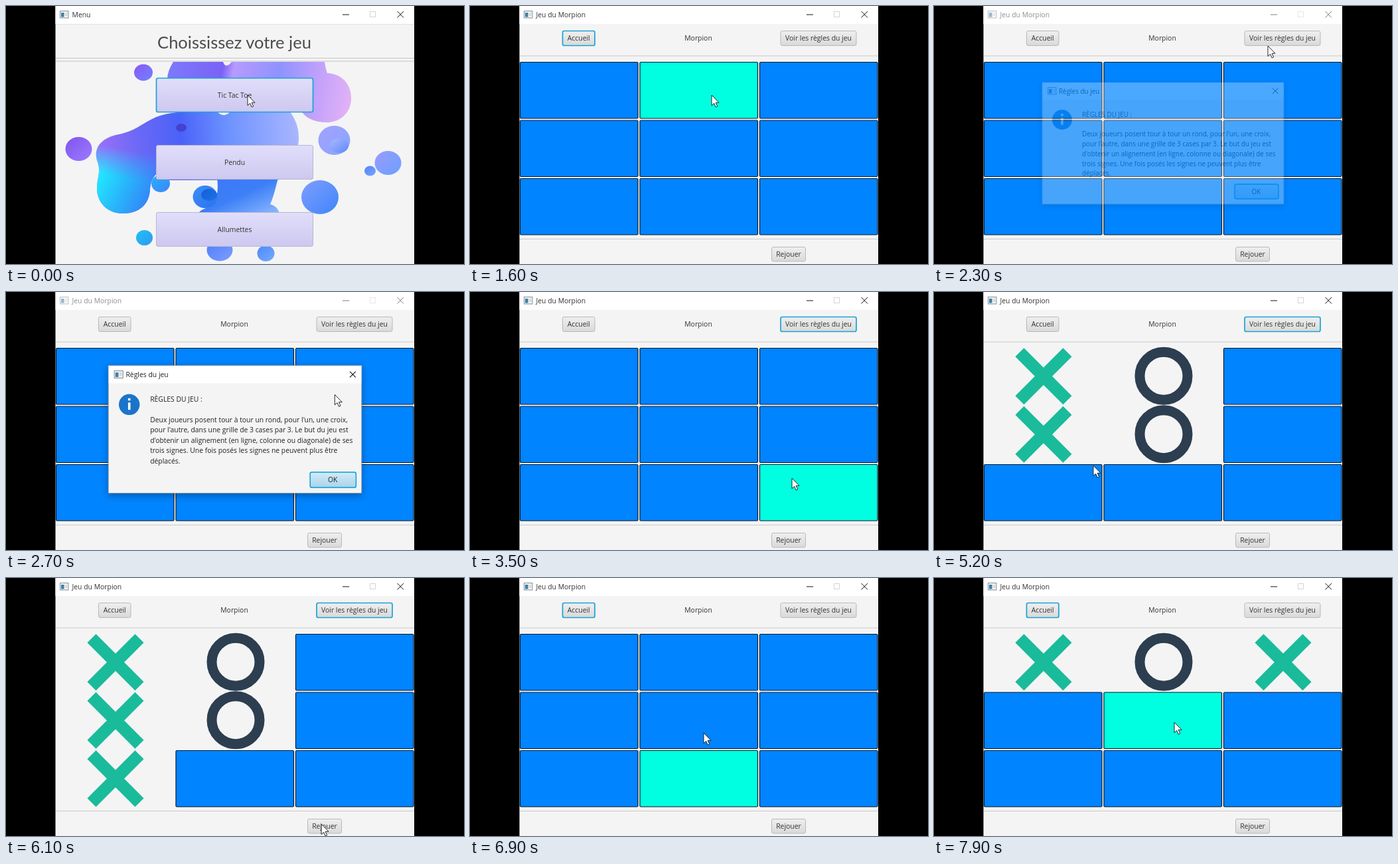
These frames come from a looping animation (690x388 px, 8 s). An HTML page:

```html
<!DOCTYPE html>
<html lang="fr">
<head>
<meta charset="utf-8">
<title>Jeu du Morpion</title>
<style>
  html, body { margin: 0; width: 100%; height: 100%; overflow: hidden; background: #000; }
  svg { display: block; width: 690px; height: 388px; }
  text { font: 10.4px "Open Sans", "Noto Sans", sans-serif; fill: #333; }
  .head { font: 25.5px Lato, "Open Sans", sans-serif; fill: #4c4c4c; }
  .mid { text-anchor: middle; }
  #dialog text { font-size: 9.92px; fill: #222; }
</style>
</head>
<body>
<svg viewBox="0 0 690 388" xmlns="http://www.w3.org/2000/svg">
  <defs>
    <linearGradient id="lilac" x2="0" y2="1"><stop stop-color="#e1defb"/><stop offset="1" stop-color="#cdc8ef"/></linearGradient>
    <linearGradient id="grey" x2="0" y2="1"><stop stop-color="#efefef"/><stop offset="1" stop-color="#d9d9d9"/></linearGradient>
    <linearGradient id="okFill" x2="0" y2="1"><stop stop-color="#d3ebf8"/><stop offset="1" stop-color="#a9d3ea"/></linearGradient>
    <linearGradient id="body" gradientUnits="userSpaceOnUse" x1="135" y1="215" x2="442" y2="190">
      <stop stop-color="#9d70f8"/><stop offset=".22" stop-color="#6a68f6"/><stop offset=".42" stop-color="#4a62f8"/>
      <stop offset=".65" stop-color="#6c92ff"/><stop offset="1" stop-color="#aab6ff"/>
    </linearGradient>
    <linearGradient id="lobe" gradientUnits="userSpaceOnUse" x1="140" y1="250" x2="222" y2="290">
      <stop stop-color="#22eaff"/><stop offset=".45" stop-color="#27b9fb"/><stop offset="1" stop-color="#3580f6"/>
    </linearGradient>
    <linearGradient id="fade" gradientUnits="userSpaceOnUse" x1="180" y1="215" x2="172" y2="258">
      <stop stop-color="#fff" stop-opacity="0"/><stop offset="1" stop-color="#fff"/>
    </linearGradient>
    <mask id="lobeMask"><rect x="120" y="190" width="110" height="130" fill="url(#fade)"/></mask>
    <linearGradient id="leg" x2="1" y2="1"><stop stop-color="#3f74f8"/><stop offset=".5" stop-color="#3c7ff6"/><stop offset="1" stop-color="#93bcff"/></linearGradient>
    <linearGradient id="top" gradientUnits="userSpaceOnUse" x1="240" y1="95" x2="520" y2="140">
      <stop stop-color="#7d7bfb"/><stop offset=".3" stop-color="#7a62f6"/><stop offset=".36" stop-color="#b79bff"/>
      <stop offset=".6" stop-color="#8f92ff"/><stop offset=".82" stop-color="#c3a2fb"/><stop offset="1" stop-color="#e2b2f6"/>
    </linearGradient>
    <clipPath id="below"><rect x="75" y="84" width="540" height="303"/></clipPath>
    <filter id="shadow" x="-10%" y="-10%" width="120%" height="130%"><feDropShadow dx="0" dy="3" stdDeviation="5" flood-opacity=".35"/></filter>
  </defs>

  <rect width="690" height="388"/>
  <rect x="74.5" width="540.5" height="388" fill="#f4f4f4"/>
  <rect x="74.5" width="540.5" height="27" fill="#fff"/>
  <g id="bar">
    <g id="icon"><rect x="81.5" y="7.5" width="12.5" height="10.5" fill="#eef1f4" stroke="#8a9299"/><rect x="83" y="10" width="4.5" height="6.5" fill="#3f7fa8"/><path d="M89 11h3.5M89 13.5h3.5" stroke="#b9c0c6"/></g>
    <text id="title" x="99.5" y="16.8"></text>
    <path d="M507 13h10M589.5 8l9.5 9.5M599 8l-9.5 9.5" stroke="#111" fill="none"/>
    <rect x="548.5" y="8.5" width="8" height="8" fill="none" stroke="#d4d4d4"/>
  </g>

  <g id="menu">
    <path d="M75 27.5h540" stroke="#e2e2e2"/>
    <text class="head mid" x="344" y="64">Choississez votre jeu</text>
    <path d="M75 78.5h540M75 83h540" stroke="#c4c4c4"/>
    <g clip-path="url(#below)">
      <path d="M252 84H327Q331 95 340 84H480Q482 96 484 101C508 102 521 120 520 141C519 161 503 175 483 175C464 175 451 168 445 158H246V122Q238 106 252 84Z" fill="url(#top)"/>
      <path d="M226 167C250 157 285 159 318 159Q328 169 338 159H428Q442 178 441 201Q439 235 410 262H230V250Q218 258 217 275C216 300 199 312 176 312C153 312 137 296 137 274C137 258 144 249 137 232C131 210 148 197 170 193C195 188 204 177 226 167Z" fill="url(#body)"/>
      <path mask="url(#lobeMask)" d="M217 275C216 300 199 312 176 312C153 312 137 296 137 274C137 258 144 249 137 232C131 210 148 197 170 193L228 210V250Q218 258 217 275Z" fill="url(#lobe)"/>
      <path d="M318 258H410Q403 288 398 298Q411 302 412 314H288Q293 305 308 302Q322 290 318 258Z" fill="url(#leg)"/>
      <ellipse cx="264" cy="183" rx="8" ry="6" fill="#4541d2"/>
      <g id="drops"></g>
    </g>
    <g id="choices"></g>
  </g>

  <g id="game">
    <path d="M75 75h540M75 350.5h540" stroke="#cacaca"/>
    <text class="mid" x="344" y="52.4">Morpion</text>
    <g id="buttons"></g>
    <g id="grid"></g>
  </g>

  <g id="dialog">
    <rect x="163" y="115" width="364" height="183" fill="#f4f4f4" stroke="#8d9aa6" stroke-width=".8" filter="url(#shadow)"/>
    <rect x="163.4" y="115.4" width="363.2" height="25" fill="#fff"/>
    <use href="#icon" x="90" y="115"/>
    <text x="188" y="131.6">Règles du jeu</text>
    <path d="M510 123.5l8.5 8.5M518.5 123.5l-8.5 8.5" stroke="#111"/>
    <circle cx="193" cy="171" r="15" fill="#1b74c9"/>
    <path d="M193 168v10.5M193 162v3.2" stroke="#fff" stroke-width="3.4"/>
    <g id="rules"></g>
    <rect x="453" y="268" width="66" height="22" rx="2.5" fill="url(#okFill)" stroke="#039ed3" stroke-width="1.4"/>
    <text class="mid" x="485.5" y="282.6">OK</text>
  </g>

  <path id="cursor" d="M0 0V15.6L3.7 12.3L6.2 18L8.7 16.9L6.2 11.3H11Z" fill="#fff" stroke="#111" stroke-width=".9"/>
</svg>
<script>
const LOOP = 8000, STEP = 100;
const OPEN_GAME = 1600, MODAL_ON = 2300, MODAL_OFF = 3300, RESTART = 6200;
const $ = id => document.getElementById(id);

function add(parent, tag, attrs, text) {
  const el = document.createElementNS("http://www.w3.org/2000/svg", tag);
  for (const k in attrs) el.setAttribute(k, attrs[k]);
  if (text) el.textContent = text;
  parent.appendChild(el);
  return el;
}

function button(parent, label, x, y, w, h, fill, edge) {
  const box = add(parent, "rect", { x, y, width: w, height: h, rx: 2.5, fill });
  add(parent, "text", { x: x + w / 2, y: y + h / 2 + 3.8, class: "mid" }, label);
  return on => {
    box.setAttribute("stroke", on ? "#1aa3d4" : edge);
    box.setAttribute("stroke-width", on ? 1.7 : 1);
  };
}

// Loose drops around the menu: x, y, rx, ry, colours from and to
[[207, 100, 14, 12.5, "#8a58f4", "#6f83ff"], [109.5, 215, 20, 18, "#8153ee", "#9b7cff"],
 [233, 267, 14, 13, "#25b2fb", "#3f83fa"], [208.5, 348.5, 12.5, 11.5, "#20c3f5", "#2f97f2"],
 [300, 287, 18.5, 17, "#3d8df8", "#2a72ee"], [306, 284, 12, 9, "#0f60d6", "#2272e6"],
 [322, 367, 19.5, 16.5, "#4b7dfa", "#7f9eff"], [391.5, 372, 13, 12, "#4b8afc", "#77a8ff"],
 [473, 287.5, 28, 25.5, "#7f9dff", "#3f86fa"], [494.5, 202, 24, 22, "#a4a0ff", "#87a7ff"],
 [502, 210, 14, 11, "#a9b9ff", "#5f88fb"], [575.5, 236, 20, 18, "#9a9cff", "#6aa0ff"],
 [548.5, 248, 8.5, 7.5, "#4f83f8", "#7ea5ff"]
].forEach(([cx, cy, rx, ry, from, to], i) => {
  const g = add($("drops"), "linearGradient", { id: "drop" + i, x2: 1, y2: 1 });
  add(g, "stop", { "stop-color": from });
  add(g, "stop", { offset: 1, "stop-color": to });
  add($("drops"), "ellipse", { cx, cy, rx, ry, fill: `url(#drop${i})` });
});

["Tic Tac Toe", "Pendu", "Allumettes"].forEach((label, i) =>
  button($("choices"), label, 226.5, 108.5 + 101 * i, 236, 51, "url(#lilac)", "#b9b5d6")(i === 0));

const focusHome = button($("buttons"), "Accueil", 139.5, 37.5, 48.5, 22, "url(#grey)", "#b8b8b8");
const focusRules = button($("buttons"), "Voir les règles du jeu", 468, 37.5, 114, 22, "url(#grey)", "#b8b8b8");
button($("buttons"), "Rejouer", 454.5, 362.5, 51, 21.5, "url(#grey)", "#b8b8b8")(false);

const RULES = ["RÈGLES DU JEU :", "",
  "Deux joueurs posent tour à tour un rond, pour l'un, une croix,",
  "pour l'autre, dans une grille de 3 cases par 3. Le but du jeu est",
  "d'obtenir un alignement (en ligne, colonne ou diagonale) de ses",
  "trois signes. Une fois posés les signes ne peuvent plus être",
  "déplacés."];
RULES.forEach((line, i) => add($("rules"), "text", { x: 223, y: 166.5 + 14.8 * i }, line));

const cells = Array.from({ length: 9 }, (_, i) => {
  const x = 75.5 + 180.5 * (i % 3), y = 84.5 + 87.5 * Math.floor(i / 3);
  const cx = x + 89.5, cy = y + 42.2, g = $("grid");
  return {
    x, y,
    tile: add(g, "rect", { x, y, width: 177.5, height: 84.5, rx: 1.5, stroke: "#06182c", "stroke-width": 1.2 }),
    X: add(g, "path", { d: `M${cx - 36} ${cy - 36}l72 72m0 -72l-72 72`, stroke: "#19bb9b", "stroke-width": 18.5 }),
    O: add(g, "circle", { cx: cx + .5, cy: cy - .5, r: 36, fill: "none", stroke: "#2c3e50", "stroke-width": 15 })
  };
});

// Moves: time, cell, sign
const moves = [[4500, 0, "X"], [4700, 1, "O"], [4900, 3, "X"], [5100, 4, "O"], [5500, 6, "X"],
  [7200, 0, "X"], [7400, 1, "O"], [7600, 2, "X"]];

// Pointer path: time, x, y
const path = [[0, 364, 134], [1600, 364, 134], [2100, 503, 60], [2400, 503, 60], [3100, 485, 280],
  [3500, 485, 280], [3800, 470, 200], [4100, 385, 132], [4300, 251, 117], [4500, 190, 130],
  [4700, 310, 130], [4900, 190, 215], [5100, 300, 222], [5200, 240, 261], [5300, 190, 290],
  [5500, 190, 295], [5900, 433, 362], [6000, 433, 362], [6100, 475, 370], [6300, 475, 370],
  [6800, 358, 280], [6900, 352, 233], [7100, 190, 130], [7200, 190, 130], [7400, 330, 125],
  [7600, 480, 125], [7700, 440, 150], [7800, 367, 176], [7900, 362, 217]];

function pointer(t) {
  const i = path.findIndex(k => k[0] > t);
  if (i < 0) return path[path.length - 1].slice(1);
  if (i === 0) return path[0].slice(1);
  const [t0, x0, y0] = path[i - 1], [t1, x1, y1] = path[i];
  const p = (t - t0) / (t1 - t0);
  return [x0 + (x1 - x0) * p, y0 + (y1 - y0) * p];
}

const show = (el, on) => el.setAttribute("display", on ? "inline" : "none");

function draw(t) {
  const inGame = t >= OPEN_GAME, modal = t >= MODAL_ON && t < MODAL_OFF;
  show($("menu"), !inGame);
  show($("game"), inGame);
  $("title").textContent = inGame ? "Jeu du Morpion" : "Menu";
  $("bar").setAttribute("opacity", modal ? .55 : 1);

  const rulesFocus = t >= 2200 && t < RESTART;
  focusRules(rulesFocus && !modal);
  focusHome(inGame && !rulesFocus);

  // Hover trails the pointer by one step
  const [hx, hy] = pointer(t - STEP);
  const start = t < RESTART ? 0 : RESTART;
  cells.forEach((c, i) => {
    const move = moves.find(m => m[1] === i && m[0] >= start && m[0] <= t);
    const over = !modal && hx >= c.x && hx <= c.x + 177.5 && hy >= c.y && hy <= c.y + 84.5;
    show(c.tile, !move);
    show(c.X, move && move[2] === "X");
    show(c.O, move && move[2] === "O");
    c.tile.setAttribute("fill", over ? "#00ffe1" : "#0084ff");
  });

  const opening = t < MODAL_ON + STEP, closing = t >= MODAL_OFF;
  const scale = opening || closing ? 1 : 1.048;
  show($("dialog"), t >= MODAL_ON && t < MODAL_OFF + STEP);
  $("dialog").setAttribute("opacity", opening || closing ? .29 : 1);
  $("dialog").setAttribute("transform", `translate(345 206.5) scale(${scale}) translate(-345 -206.5)`);

  $("cursor").setAttribute("transform", `translate(${pointer(t).join(" ")})`);
}

const t0 = performance.now();
function tick() {
  const t = (performance.now() - t0) % LOOP;
  draw(Math.floor(t / STEP) * STEP);
  requestAnimationFrame(tick);
}
tick();
</script>
</body>
</html>
```
